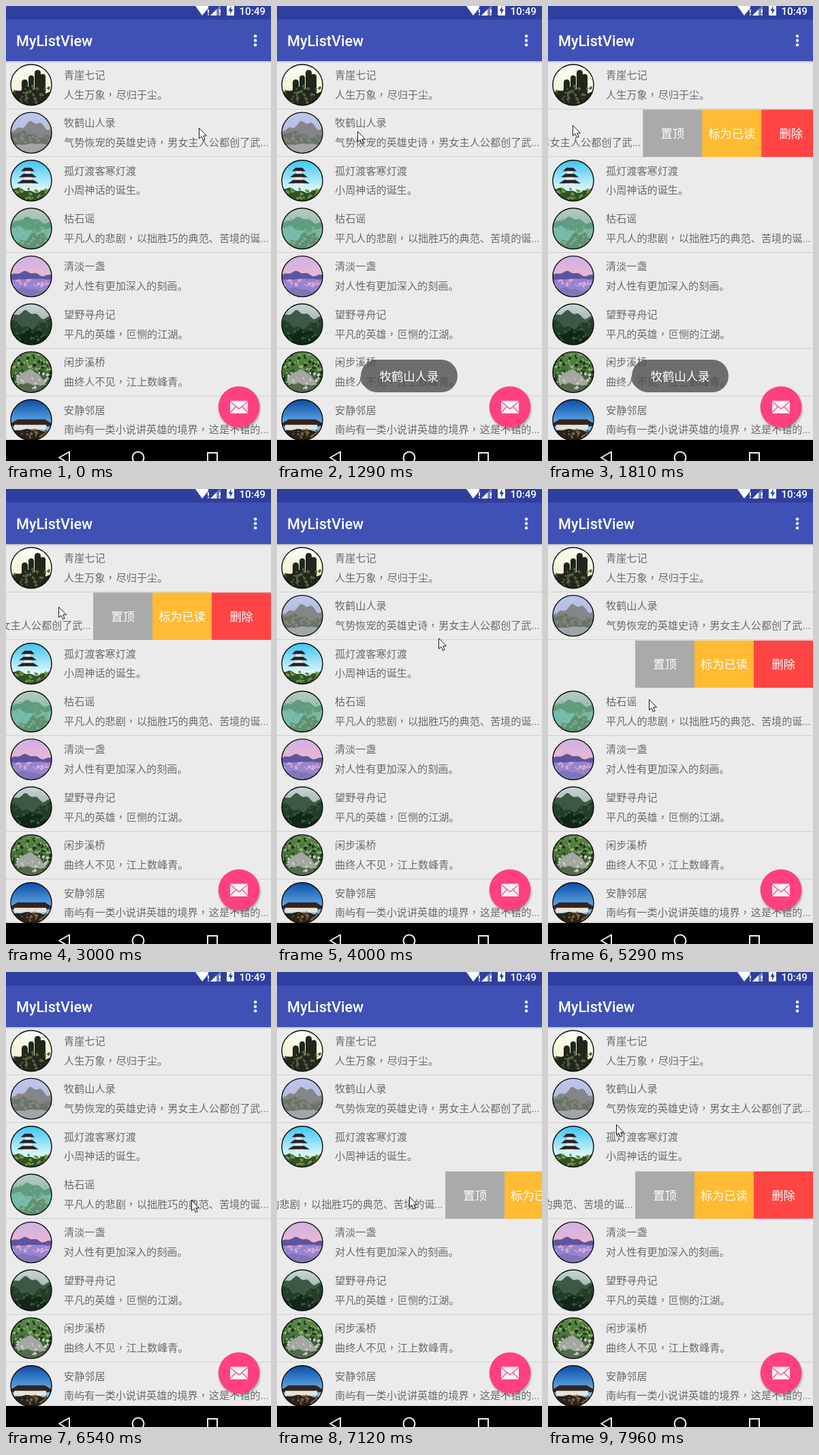
Write an HTML page that moves like this. It is 389 px wide and 669 px high and loops after 7990 ms.

```html
<!DOCTYPE html>
<html lang="zh-CN">
<head>
<meta charset="utf-8">
<title>MyListView</title>
<style>
  html, body { margin: 0; width: 100%; height: 100%; overflow: hidden; background: #ebebeb; }
  svg { display: block; width: 100vw; height: 100vh; }
  text { font-family: Roboto, "Noto Sans CJK SC", "Noto Sans CJK", sans-serif; white-space: pre; }
  .line { font-size: 15.13px; fill: #6a6a6a; }
  .comma { font-family: "Noto Sans CJK TC", "Noto Sans CJK", sans-serif; letter-spacing: 1px; }
  .label { font-size: 17.3px; fill: #fff; text-anchor: middle; }
</style>
</head>
<body>
<svg viewBox="0 0 389 669" xmlns="http://www.w3.org/2000/svg">
  <defs id="defs">
    <clipPath id="disc"><circle r="30"/></clipPath>
    <linearGradient id="edge" x2="0" y2="1"><stop stop-color="#bcbcc0"/><stop offset="1" stop-color="#ebebeb"/></linearGradient>
    <filter id="soft" x="-30%" y="-30%" width="160%" height="160%"><feGaussianBlur stdDeviation="1.6"/></filter>
  </defs>
  <rect width="389" height="669" fill="#ebebeb"/>
  <g id="dividers" fill="#cfcfcf"></g>
  <g id="list"></g>

  <rect y="81" width="389" height="3" fill="url(#edge)"/>
  <rect y="20" width="389" height="61" fill="#3f51b5"/>
  <rect width="389" height="20" fill="#303f9f"/>
  <text x="15" y="59" font-size="21.6" font-weight="500" fill="#fff">MyListView</text>
  <g fill="#fff">
    <circle cx="366" cy="44.3" r="2.2"/><circle cx="366" cy="50.8" r="2.2"/><circle cx="366" cy="57.3" r="2.2"/>
    <path d="M278 0H297V3L288 14Z"/>
    <path d="M296 5h2v5h-2zM296 11.5h2v2h-2z"/>
    <path d="M300 14L315 -1V14Z" opacity=".35"/>
    <path d="M300 14L309 5V14Z"/>
    <path d="M313 5h2v5h-2zM313 11.5h2v2h-2z"/>
    <rect x="324" y="-3" width="11" height="17" rx="1"/>
    <path d="M330.5 0L326.5 7H329V12L333 5H330.5Z" fill="#303f9f"/>
    <text x="342.5" y="12.5" font-size="15.13" font-weight="500">10:49</text>
  </g>

  <circle cx="343" cy="592" r="30.5" opacity=".28" filter="url(#soft)"/>
  <circle cx="342" cy="589.5" r="30.3" fill="#ff4081"/>
  <rect x="329" y="580.5" width="26" height="18.5" rx="1" fill="#f6f2f4"/>
  <path d="M329 581.5L342 592.5L355 581.5M329 598L337.5 589M355 598L346.5 589" fill="none" stroke="#ff4081" stroke-width="1.1"/>

  <rect y="638" width="389" height="31"/>
  <g fill="none" stroke="#f2f2f2" stroke-width="2">
    <path d="M78 664L93 655.5V673Z" stroke-linejoin="round"/>
    <circle cx="194" cy="664" r="8.4"/>
    <rect x="296" y="657" width="14" height="14"/>
  </g>

  <g id="toast">
    <rect x="123" y="520" width="142" height="48" rx="24" fill="#4c4c4c" opacity=".79"/>
    <text class="label" x="194" y="550.5" id="note"></text>
  </g>
  <path id="arrow" d="M.5 .5V16L4 12.8L6.5 18.5L9 17.4L6.7 11.9H11.5Z" fill="#fff" stroke="#15152a"/>
</svg>
<script>
const LOOP = 7990, PITCH = 70.4, BUTTON = 87;
const $ = id => document.getElementById(id);

// Picture helpers; every scene is drawn around 0,0 inside a disc of radius 30
let seed = 7;
const random = () => (seed = seed * 16807 % 2147483647) / 2147483647;
const shape = (fill, d) => `<path fill="${fill}" d="${d}"/>`;

function sky(id, top, bottom) {
  $('defs').innerHTML += `<linearGradient id="${id}" x2="0" y2="1"><stop stop-color="${top}"/><stop offset=".7" stop-color="${bottom}"/></linearGradient>`;
  return `<circle r="30" fill="url(#${id})"/>`;
}

function ridge(fill, base, height, phase) {
  let d = 'M-32 32';
  for (let x = -32; x <= 32; x += 2) {
    const y = base - height * (Math.sin(x * .11 + phase) + .4 * Math.sin(x * .37 + phase * 2));
    d += `L${x} ${y.toFixed(1)}`;
  }
  return shape(fill, d + 'L32 32Z');
}

function leaves(fill, top, bottom, count) {
  let d = '';
  for (let i = 0; i < count; i++) {
    const x = random() * 60 - 30, y = top + random() * (bottom - top), r = 1 + random() * 2;
    d += `M${x.toFixed(1)} ${y.toFixed(1)}l${r} ${-r}l${r} ${r}l${-r} ${r}z`;
  }
  return shape(fill, d);
}

const roof = (y, w) => shape('#2a2026', `M${-5 - w} ${y + 5}L${-5 - w / 2} ${y}H${w / 2 - 5}L${w - 5} ${y + 5}Z`) +
  shape('#e4ece6', `M${-4 - w / 2} ${y + 5}h${w - 2}v4h${2 - w}z`);
const pillar = (x, top, w) => `<rect x="${x}" y="${top}" width="${w}" height="40" rx="${w / 2}" fill="#20271c"/>`;

const scenes = [
  sky('s0', '#fdfdf4', '#f3f0d0') + pillar(-14, -8, 9) + pillar(-4, -14, 8) + pillar(5, -22, 9) + pillar(13, -16, 8) +
    ridge('#20271c', 8, 4, 2) + leaves('#56613c', 2, 28, 40),
  sky('s1', '#bcc6ee', '#b3b9d0') + ridge('#85868a', -10, 6, 1.2) + ridge('#66756a', 2, 4, 3) +
    leaves('#8c8178', -6, 14, 50) + ridge('#a2a5a8', 17, 1, 1),
  sky('s2', '#3cc4f2', '#d8f7fa') + [-19, -10, -1].map((y, i) => roof(y, 10 + i * 3)).join('') +
    ridge('#2d5428', 14, 3, 4) + leaves('#78933c', 12, 28, 40),
  sky('s3', '#b6ccc0', '#7fb5a0') + ridge('#5f9c80', -12, 4, 2) + ridge('#75bcac', 1, 4, 4) +
    ridge('#5c9272', 13, 7, .5) + leaves('#86aa8c', -14, 26, 40),
  sky('s4', '#cfb2e2', '#f3b9cf') + ridge('#5d559c', -4, 3, 2.5) + ridge('#9784cc', 4, .6, 1) +
    leaves('#d9a9dc', 5, 14, 30) + ridge('#7f76ba', 19, 2, 3),
  sky('s5', '#c8d6d8', '#8aa39a') + ridge('#3d5946', -14, 5, 2.4) + ridge('#213d27', 0, 6, 5) +
    ridge('#12251a', 13, 5, 1.5) + leaves('#315a36', -6, 26, 40),
  sky('s6', '#5d8a48', '#3b6332') + leaves('#8bb56c', -28, 8, 60) + leaves('#1f3420', -26, 12, 60) +
    shape('#a3a79f', 'M-24 15L-15 2-1-5 13 5 22 18 4 22Z') + ridge('#56694f', 20, 3, 2) + leaves('#c5c9c0', 0, 24, 24),
  sky('s7', '#0a4ca6', '#74bdf2') + shape('#302522', 'M-30 5L-20-1H20L30 5V9H-30Z') +
    shape('#e8e2d6', 'M-25 7H22V14H-25Z') + ridge('#2a2219', 15, 1.5, 2) + leaves('#7c6244', 14, 26, 30)
];

const books = [
  ['青崖七记', '人生万象，尽归于尘。'],
  ['牧鹤山人录', '气势恢宠的英雄史诗，男女主人公都创了武...'],
  ['孤灯渡客寒灯渡', '小周神话的诞生。'],
  ['枯石谣', '平凡人的悲剧，以拙胜巧的典范、苦境的诞...'],
  ['清淡一盏', '对人性有更加深入的刻画。'],
  ['望野寻舟记', '平凡的英雄，叵恻的江湖。'],
  ['闲步溪桥', '曲终人不见，江上数峰青。'],
  ['安静邻居', '南屿有一类小说讲英雄的境界，这是不错的...']
];

const menu = [['#aaaaaa', '置顶'], ['#ffbb33', '标为已读'], ['#ff4444', '删除']].map(([fill, label], i) =>
  `<g transform="translate(${389 + i * BUTTON} 0)"><rect y="-34" width="${BUTTON + .5}" height="69.5" fill="${fill}"/>
   <text class="label" x="43.5" y="7.5">${label}</text></g>`).join('');

const line = (y, text) =>
  `<text class="line" x="85" y="${y}">${text.replace(/，/g, '<tspan class="comma" lang="zh-TW">，</tspan>')}</text>`;

$('list').innerHTML = books.map(([title, blurb], i) =>
  `<g><g transform="translate(37 0)"><g clip-path="url(#disc)">${scenes[i]}</g>
   <circle r="30" fill="none" stroke="#0c0c0c" stroke-width="1.4"/></g>
   ${line(-9.3, title)}${line(19.5, blurb)}${menu}</g>`).join('');
$('note').textContent = books[1][0];
const rows = [...$('list').children];

// Thin dividers only show where they cover enough of a pixel
for (let i = 1; i < books.length; i++) {
  const y = 81 + i * PITCH;
  if (y % 1 > .3) $('dividers').innerHTML += `<rect y="${Math.floor(y)}" width="389" height="1"/>`;
}

// Pointer moves: start, end, x, y
const moves = [
  [50, 80, 285, 179], [340, 800, 118, 184], [1310, 1700, 36, 175], [2070, 2840, 77, 173],
  [3340, 3540, 45, 185], [3690, 4000, 237, 219], [4000, 4470, 290, 257], [4600, 5290, 148, 309],
  [5320, 5460, 161, 316], [5620, 6400, 272, 335], [6750, 7530, 104, 325], [7680, 7960, 100, 224]
];
const swipes = [
  { row: 1, open: 1330, close: 3690 },
  { row: 2, open: 4680, close: 5650 },
  { row: 3, open: 6830, close: LOOP }
];

const ramp = (t, start, length) => Math.min(1, Math.max(0, (t - start) / length));
const ease = (t, start, length) => { const u = ramp(t, start, length); return u * u * (3 - 2 * u); };
const place = (el, x, y) => el.setAttribute('transform', `translate(${x} ${y})`);

function pointer(t) {
  let x = 283, y = 179;
  for (const [from, to, nextX, nextY] of moves) {
    const u = ease(t, from, to - from);
    x += (nextX - x) * u;
    y += (nextY - y) * u;
  }
  return [Math.round(x), Math.round(y)];
}

function draw(t) {
  const shift = rows.map(() => 0);
  for (const { row, open, close } of swipes) shift[row] = -3 * BUTTON * (ease(t, open, 550) - ease(t, close, 300));
  rows.forEach((el, i) => place(el, shift[i], 116 + i * PITCH));
  $('toast').setAttribute('opacity', ramp(t, 650, 400) - ramp(t, 2550, 400));
  place($('arrow'), ...pointer(t));
}

const start = performance.now();
function tick() {
  draw((performance.now() - start) % LOOP);
  requestAnimationFrame(tick);
}
tick();
</script>
</body>
</html>
```
